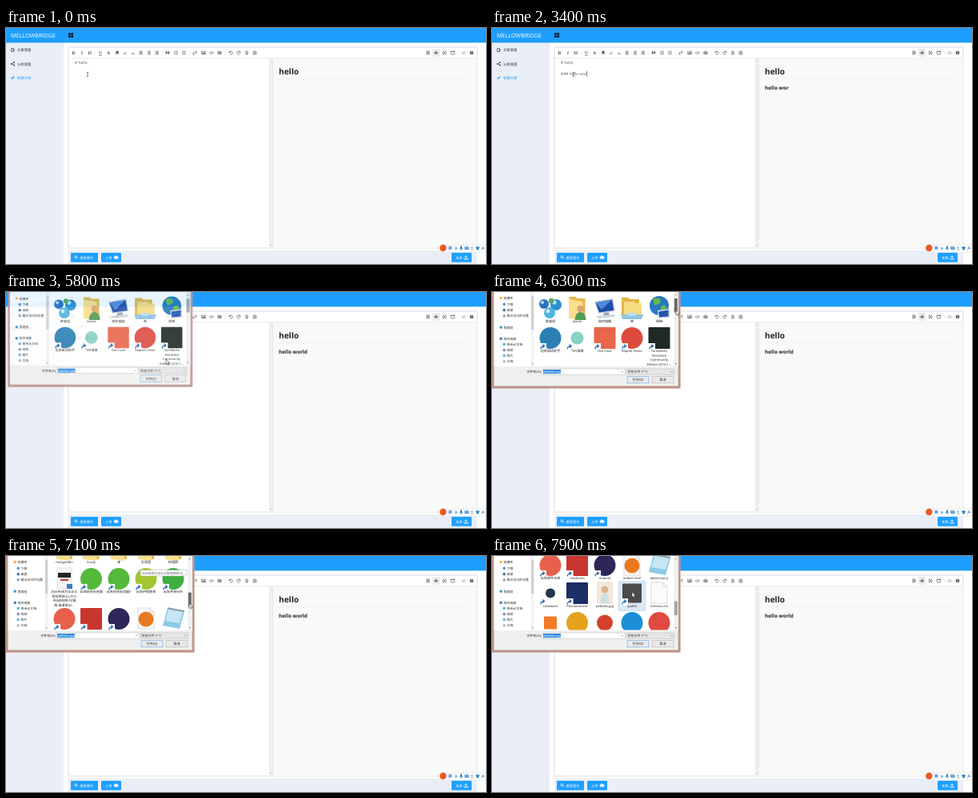
An HTML page for the animation above (8000 ms loop, 600 by 295 pixels).

```html
<!DOCTYPE html>
<html lang="zh">
<head>
<meta charset="utf-8">
<title>Markdown editor</title>
<style>
html, body { margin: 0; width: 100%; height: 100%; overflow: hidden; background: #fff; }
svg { display: block; width: 100vw; height: 100vh; }
text { font-family: "Open Sans", "Noto Sans CJK SC", "Noto Sans CJK", sans-serif; white-space: pre; text-rendering: geometricPrecision; }
.serif { font-family: "Liberation Serif", serif; }
</style>
</head>
<body>
<svg id="stage" viewBox="0 0 600 295" xmlns="http://www.w3.org/2000/svg"></svg>
<script>
const BLUE = '#1e9fff', INK = '#5c5c5c', PANEL = '#eaeef6';

// Markup helpers
const rect = (x, y, w, h, fill, more = '') => `<rect x="${x}" y="${y}" width="${w}" height="${h}" fill="${fill}" ${more}/>`;
const disc = (x, y, r, fill, more = '') => `<circle cx="${x}" cy="${y}" r="${r}" fill="${fill}" ${more}/>`;
const label = (x, y, s, size, fill = '#333', more = '') => `<text x="${x}" y="${y}" font-size="${size}" fill="${fill}" ${more}>${s}</text>`;
const line = (x, y, d, color = INK, w = 0.65) => `<path transform="translate(${x} ${y})" d="${d}" fill="none" stroke="${color}" stroke-width="${w}"/>`;
const solid = (x, y, d, color = INK) => `<path transform="translate(${x} ${y})" d="${d}" fill="${color}"/>`;
const MID = 'text-anchor="middle"';

const CLOUD = 'M-2 1.6a1.3 1.3 0 0 1 0-2.5a1.7 1.7 0 0 1 3.2-.5a1.5 1.5 0 0 1 .9 3z';
const UPLOAD = 'M-2.2 .8v1.4h4.4v-1.4M0 1V-2M-1.5-.6L0-2.1L1.5-.6';
const PENCIL = 'M-2 2l.4-1.5L1-2l1.1 1.1L-.5 1.6z';

function shell() {
  const button = (x, w, s, tx) => rect(x, 281, w, 11.7, BLUE, 'rx="1"') + label(tx, 288.5, s, 4.3, '#fff');
  return rect(0, 0, 600, 295, '#fff') + rect(0, 18, 72, 277, PANEL) + rect(0, 0, 600, 18.4, BLUE)
    + label(6, 11.6, 'MELLOWBRIDGE', 7.25, '#fff')
    + [[78, 6], [81.3, 6], [78, 9.2], [81.3, 9.2]].map(([x, y]) => rect(x, y, 2.8, 2.8, '#0a1a28', 'rx=".9"')).join('')
    + line(8.2, 27.4, 'M-1.8-1V2H1V-2H-.8zM-.8-2v1h-1M1-1h.9V2H1', '#333', 0.6)
    + label(14, 29, '文章管理', 4.35)
    + line(8.4, 44.8, 'M1.5-1.6L-1.5 0L1.5 1.6', '#333', 0.6)
    + disc(6.8, 44.8, 0.9, '#333') + disc(10, 43.1, 0.9, '#333') + disc(10, 46.5, 0.9, '#333')
    + label(14, 46.6, '分类管理', 4.35)
    + solid(8.4, 62.2, PENCIL, BLUE) + label(14, 64, '新建文章', 4.35, BLUE)
    + rect(78, 277.8, 511, 18, PANEL)
    + button(81, 34, '搜索图片', 92.3)
    + line(87.8, 286.5, 'M.6.6L2 2M1-.4A1.4 1.4 0 1 1-1.8-.4A1.4 1.4 0 1 1 1-.4', '#fff', 0.8)
    + button(119, 25, '上传', 124) + solid(137.5, 286.9, CLOUD, '#fff')
    + button(557, 25, '发表', 562) + line(575, 286.9, UPLOAD, '#fff', 0.9);
}

function toolbar() {
  const letter = (x, s, more = '') => label(x, 33, s, 5.8, INK, MID + ' class="serif" font-weight="bold" ' + more);
  const bars = (x, from) => line(x, 31, from.map((a, i) => `M${a[0]} ${i * 1.3 - 2}H${a[1]}`).join(''), INK, 0.7);
  const L = -2.2, R = 2.2;
  const code = 'M-1.2-1.5L-2.6 0L-1.2 1.5M1.2-1.5L2.6 0L1.2 1.5M.4-1.9L-.4 1.9';
  const bullets = x => line(x, 31, 'M-1 -1.7H2.3M-1 0H2.3M-1 1.7H2.3') + line(x, 31, 'M-2.3-1.7h.8M-2.3 0h.8M-2.3 1.7h.8', INK, 0.9);
  return letter(84.5, 'B') + letter(95, 'I', 'font-style="italic"') + letter(104.7, 'H')
    + letter(118, 'U', 'text-decoration="underline"') + letter(128.3, 'S', 'text-decoration="line-through"')
    + solid(139, 31, 'M-1.6-2.2H1.6V2.2L0 .8L-1.6 2.2z')
    + label(149, 32.6, 'x²', 5, INK, MID + ' class="serif" font-weight="bold"')
    + label(159, 32.6, 'x₂', 5, INK, MID + ' class="serif" font-weight="bold"')
    + bars(169, [[L, 1], [L, R], [L, .6], [L, R]]) + bars(179, [[-1.2, 1.2], [L, R], [-1, 1], [L, R]])
    + bars(188.5, [[-1, R], [L, R], [-.6, R], [L, R]])
    + solid(202, 31, 'M-2.3-1.8h1.9v2L-1.4 1.8h-.9zM.4-1.8h1.9v2L1.3 1.8H.4z')
    + bullets(212.5) + bullets(222.3)
    + line(236, 31, 'M-.3.8L-1.1 1.8A1 1 0 0 1-2.1.4L-.4-1M.3-.8L1.1-1.8A1 1 0 0 1 2.1-.4L.4 1', INK, 0.8)
    + line(247, 31, 'M-2.4-1.8H2.4V1.8H-2.4z', INK, 0.6) + solid(247, 31, 'M-1.8 1.3V.6L-.8-.4L0 .3L1-1L1.8.2V1.3z')
    + line(257, 31, code) + line(267, 31, 'M-2.2-1.8H2.2V1.8H-2.2zM-2.2-.5H2.2M-2.2.7H2.2M-.7-1.8V1.8M.8-1.8V1.8', INK, 0.5)
    + line(281, 31, 'M-1.8-2V-.4H-.2M-1.8-.6A2 2 0 1 1-1.3 1.5', INK, 0.75)
    + line(291, 31, 'M1.8-2V-.4H.2M1.8-.6A2 2 0 1 0 1.3 1.5', INK, 0.75)
    + line(301, 31, 'M-1.4-1.2L-1.2 2.1H1.2L1.4-1.2M-2-1.4H2M-.6-2.1H.6M-.4-.4V1.4M.4-.4V1.4', INK, 0.55)
    + line(311, 31, 'M-2-2H1.3L2-1.3V2H-2zM-1-2V-.7H.8V-2M-1.1 2V.5H1.1V2', INK, 0.55)
    + bars(527.5, [[L, R], [L, R], [L, R], [L, R]])
    + rect(533.2, 26.6, 8.8, 8.8, '#eee', 'stroke="#ddd" stroke-width=".5"')
    + line(537.6, 31, 'M-2.5 0Q0-3.2 2.5 0Q0 3.2-2.5 0z', '#444', 0.6) + disc(537.6, 31, 1, '#444')
    + line(548, 31, 'M-1.7-1.7L1.7 1.7M1.7-1.7L-1.7 1.7') + solid(548, 31, 'M-2.2-2.2h1.9l-1.9 1.9zM2.2-2.2v1.9l-1.9-1.9zM2.2 2.2H.3L2.2.3zM-2.2 2.2V.3L-.3 2.2z')
    + line(558.3, 31, 'M-2.2-1.9H2.2V1.9H-2.2zM-2.2-1.4H2.2') + line(572, 31, code, '#888')
    + disc(582, 31, 2.3, '#555') + label(582, 32.5, '?', 4, '#fff', MID + ' font-weight="bold"')
    + [111, 195, 229, 274, 565].map(x => rect(x, 27.5, 0.4, 7, '#e4e4e4')).join('');
}

function editor() {
  return rect(78, 24, 511, 251, '#fff', 'stroke="#d4d4d4" stroke-width=".8"')
    + rect(333, 38, 255.6, 236.6, '#f9f9f9') + rect(78, 37.6, 511, 0.6, '#ddd')
    + rect(328.6, 38, 4.8, 236.6, '#efefef') + rect(333.2, 38, 0.5, 236.6, '#ddd')
    + solid(331, 41, 'M-1 .6L0-.6L1 .6z', '#aaa') + solid(331, 271.6, 'M-1-.6L0 .6L1-.6z', '#aaa')
    + toolbar() + label(86, 45.2, '# hello', 4.9, INK)
    + `<text id="typed" x="86" y="59.2" font-size="4.9" fill="${INK}"></text>`
    + `<rect id="caret" width=".6" height="6.6" fill="#222"/>`
    + label(341, 57.8, 'hello', 10.1, '#222', 'font-weight="bold"') + rect(341, 63, 239, 0.5, '#e9e9e9')
    + `<text id="heading" x="341" y="76.8" font-size="6.4" font-weight="bold" fill="#222"></text>`;
}

function inputBar() {
  const c = '#2b80cf';
  return rect(544, 271, 56, 9, '#fdfdfd', 'stroke="#cfd8e0" stroke-width=".5"') + disc(546.3, 275, 4.2, '#f0561f')
    + label(555.2, 277.2, '英', 5, c, MID + ' font-weight="bold"')
    + solid(562, 275.4, 'M-.8-1.6A1.7 1.7 0 1 1-1 1.4A1.6 1.6 0 0 0-.8-1.6z', c)
    + rect(567.8, 272.6, 2.2, 3.6, c, 'rx="1"') + line(569, 275.4, 'M-1.8-.3A1.8 1.8 0 0 0 1.8-.3M0 1.5V2.5', c, 0.6)
    + rect(573.4, 273.2, 5, 3.8, c, 'rx=".6"') + line(576, 275, 'M-1.8-.7H1.8M-1.8.7H1.8', '#fff', 0.45)
    + disc(582.4, 274.4, 1.1, '#9ab') + solid(582.6, 276, 'M-2 1.6Q0-1.5 2 1.6z', '#9ab')
    + solid(589.5, 275.2, 'M-1-2H1L2.6-.8L1.8.4L1.3 0V2.2H-1.3V0L-1.8.4L-2.6-.8z', c)
    + line(596, 275.2, 'M-1.8 2L.6-.4', c, 1) + line(596, 275.2, 'M.4-2A1.3 1.3 0 1 0 2 .1', c, 0.9);
}

// Icons are drawn around 0,0 in about 28 px
const ICONS = {
  home: () => disc(-8, -5, 6, '#2c6fbd') + disc(7, -4, 7, '#2a8fd0') + disc(-1, 6, 7, '#4fb4dc')
    + disc(-10, -7, 2.2, '#a8d3f3') + disc(5, -7, 2.6, '#b5e0f5') + disc(-3, 4, 2.4, '#d3f1fa')
    + disc(1, -9, 3.2, '#5aa65c'),
  folder: () => solid(0, 0, 'M-10-14H-2L0-12H10V13H-10z', '#e3b94f') + solid(0, 0, 'M-10-11L7-8V15L-10 13z', '#f8df8b'),
  user: () => ICONS.folder() + disc(4, 1, 4, '#d9a273') + solid(4, 10, 'M-7 5Q-6-5 0-5Q6-5 7 5z', '#4f9d52'),
  pc: () => solid(0, 0, 'M-13-8L10-12L13 4L-8 7z', '#c5d2de') + solid(0, 0, 'M-11.5-6.8L9-10.4L11.4 2.8L-7 5.4z', '#1f4ea8')
    + solid(0, 0, 'M-11.5-6.8L9-10.4L-4 2z', '#5488da') + solid(0, 0, 'M-1 6L5 5.2L6 9H-2z', '#97a6b4') + solid(0, 0, 'M-11 10L12 8L13 11L-9 13z', '#cfd7df'),
  shelf: () => solid(0, 0, 'M-13-13H-4L-3-11H9V9H-13z', '#e2b548') + solid(0, 0, 'M-10-8H3L5-6H12V10H-10z', '#f6dc83')
    + solid(0, 0, 'M-14 8H14L12 14H-12z', '#8fc4e4') + rect(-5, 6, 10, 4, '#b9ddf0'),
  globe: () => disc(0, -3, 12, '#2678c0') + solid(-1, -3, 'M-7-8Q2-12 3-5Q0 0-5-1zM3 1Q10-3 10 4Q6 9 3 6z', '#67b84c')
    + solid(0, 0, 'M-2 3L13 1V12L-1 13z', '#d4dde6') + solid(0, 0, 'M-.6 4.4L11.6 2.6V10.6L0 11.6z', '#2455b0'),
  page: c => solid(0, 0, 'M-10-13H5L10-8V13H-10z', '#fbfbfb') + line(0, 0, 'M-10-13H5L10-8V13H-10zM5-13V-8H10', '#c4c4c4', 0.6) + (c ? disc(0, 1, 9.5, c) : ''),
  book: () => rect(-9, -13, 18, 26, '#f4f4f4', 'stroke="#ccc" stroke-width=".5"') + rect(-8, -7, 16, 6, '#242424') + rect(-5, 1, 10, 2, '#c33') + rect(3, 7, 7, 6, '#3c7fc4'),
  note: () => solid(0, 0, 'M-7-13L14-9L8 13L-13 9z', '#8ec9e6') + solid(0, 0, 'M-6-11L12-8L8 6L-10 3z', '#c6e6f3') + line(0, 0, 'M-7-13L14-9', '#8a8f96', 1.6),
  photo: () => rect(-10, -14, 20, 28, '#f3e8da') + disc(0, -4, 4.5, '#dbb48c') + solid(0, 6, 'M-6 7Q-5-6 0-6Q5-6 6 7z', '#cfe0e4'),
  disc: (c, r = 13.5) => disc(0, 0.5, r, c),
  box: (c, r = 13.5) => rect(-r, 0.5 - r, r * 2, r * 2, c, 'rx="1"')
};
const shortcut = rect(-14, 7, 9, 8.6, '#fff') + line(-9.8, 11.4, 'M-2.5 3Q-2-1 2-1M0-3L2.4-1L0 1.2', '#2264b4', 1.2);

// Each row: centre, then "icon color radius+|label"; a plus marks a shortcut
const ROWS = [
  [20, 'home|家庭组', 'user|tavino', 'pc|我的电脑', 'shelf|库', 'globe|网络'],
  [57, 'disc #2b7fb4+|迅岚驱动助手', 'disc #86d4c4 8+|飞叶录屏', 'box #e8664a+|Dot Cove', 'disc #dd4b3e+|Maplet Vision', 'box #1f2a24+|TarnWorks/FernDeck/Community/Edition 2016.1...'],
  [111, 'folder|照片', 'folder|资料', 'folder|作业', 'folder|软件', 'folder|音乐'],
  [148, 'folder|课件', 'folder|notes', 'folder|模板', 'folder|代码', 'folder|temp'],
  [185, 'folder|文稿', 'folder|备份', 'folder|图标', 'folder|demo', 'folder|素材'],
  [222, 'folder|mistgarden', 'folder|Study', 'folder|缘', 'folder|实验室', 'folder|校园网'],
  [259, 'book|[Net布线方法与工/程范例讲义].方小/舟&amp;赵知秋.扫描/版.高清版02...', 'disc #55b93b+|云岚轻快浏览器', 'disc #55b93b+|云岚轻快浏览器7', 'disc #a3c531+|云岚护航管家', 'disc #3fae40+|云岚共享WIFI'],
  [309, 'disc #e8604c+|云岚软件仓库', 'box #c9352f+|tinybricks', 'disc #2d2658+|moonlit', 'page #e87b22|index2.html', 'note|datescript.js'],
  [344, 'disc #22364c 6+|Lowbeam', 'box #1d2d66+|Paintdesk.exe', 'photo|pebbles.jpg', 'box #4b4b4b 12+|quillet', 'page|timeaxis.txt'],
  [381, 'box #f27a24 8|panel', 'disc #e5a21d|游戏盒', 'disc #d3402b 10|画板', 'disc #1c8fd8|播放器', 'disc #e14a40|小助手']
];
const COLS = [73, 106.5, 141, 175, 209];

function fileItem(spec, x, y) {
  const [icon, text] = spec.split('|'), [kind, color, size] = icon.replace('+', '').split(' ');
  return `<g transform="translate(${x} ${y})">${ICONS[kind](color, size && +size)}${icon.endsWith('+') ? shortcut : ''}</g>`
    + text.split('/').map((s, i) => label(x, y + 18.3 + i * 5.5, s, 4.1, '#222', MID)).join('');
}

function dialog() {
  const nav = [['收藏夹', 7.6, 0, '#f3b63b'], ['下载', 15.4, 1, '#4d9bd6'], ['桌面', 22.6, 1, '#3677bd'], ['最近访问的位置', 29.8, 1, '#7ea9c9'],
    ['家庭组', 44.2, 0, '#36a0d4'], ['我的电脑', 58.4, 0, '#4180c0'], ['青禾云文档', 65.4, 1, '#58b5ea'], ['视频', 72.6, 1, '#7c8fa6'], ['图片', 79.6, 1, '#6fb1d8'], ['文档', 86.8, 1, '#a9b9c8']];
  const button = (x, s, edge) => rect(x, 105.3, 27, 8.6, '#e9e9e9', `stroke="${edge}" stroke-width=".6"`) + label(x + 13.5, 111.1, s, 4, '#222', MID);
  const field = (x, w, fill) => rect(x, 96, w, 7.2, fill, 'stroke="#b5b5b5" stroke-width=".5"') + line(x + w - 3.2, 99.5, 'M-1-.5L0 .6L1-.5', '#444', 0.5);
  return rect(0, -12, 235.6, 132.6, '#bf978c') + rect(2.6, -12, 230, 129.4, '#f0f0f0') + rect(2.6, -12, 230, 105, '#fff')
    + nav.map(([s, y, deep, c]) => rect(9.6 + deep * 4, y - 1.6, 3.2, 3.2, c, 'rx=".8"') + label(14.5 + deep * 4, y + 1.5, s, 3.95)).join('')
    + rect(48.6, 0, 4, 93, '#f3f3f3') + rect(49, 5, 3.2, 42, '#d0d0d0') + solid(50.6, 90, 'M-1-.5L0 .7L1-.5z', '#666')
    + `<g clip-path="url(#pane)"><g id="files">`
    + `<rect id="hover" x="158" y="329.5" width="34" height="37" fill="#d9e8f4" stroke="#b4d0e6" stroke-width=".5"/>`
    + ROWS.map(([y, ...items]) => items.map((s, i) => fileItem(s, COLS[i], y)).join('')).join('') + '</g></g>'
    + rect(227.2, 0, 5.2, 93, '#f0f0f0') + solid(229.8, 3.4, 'M-1 .6L0-.6L1 .6z', '#555') + solid(229.8, 89.6, 'M-1-.6L0 .6L1-.6z', '#555')
    + `<rect id="thumb" x="227.8" width="4" height="17.5"/>`
    + `<g id="tip">${rect(168, 17.6, 58, 7.4, '#fff', 'stroke="#a5a5a5" stroke-width=".5"')}${label(169.5, 22.8, '[Net布线方法与工程范例讲义]...', 3.9, '#555')}</g>`
    + label(61.8, 101, '文件名(N):', 4, '#222', 'text-anchor="end"') + field(63, 103, '#fff') + rect(64, 97, 22, 5.2, '#2f8be0')
    + label(64.4, 101, 'pebbles.jpg', 4, '#fff') + field(168, 60, '#e6e6e6') + label(169.6, 101, '所有文件 (*.*)', 4)
    + button(169, '打开(O)', '#6aa9e0') + button(200, '取消', '#b5b5b5');
}

const stage = document.getElementById('stage');
stage.innerHTML = '<defs><clipPath id="pane"><rect x="54" y="0" width="173" height="92.6"/></clipPath></defs>'
  + shell() + editor() + inputBar() + `<g id="dialog">${dialog()}</g>`
  + `<g id="beam">${line(0, 0, 'M-1.3-2.8Q0-2.8 0-2Q0-2.8 1.3-2.8M0-2V2M-1.3 2.8Q0 2.8 0 2Q0 2.8 1.3 2.8', '#333', 0.6)}</g>`
  + `<g id="arrow"><path d="M0 0V6.4L1.5 5L2.5 7.3L3.5 6.8L2.5 4.7H4.6z" fill="#fff" stroke="#222" stroke-width=".5"/></g>`;
const ui = {};
stage.querySelectorAll('[id]').forEach(e => ui[e.id] = e);

const LOOP = 8000, TEXT = '### hello world', PREFIX = 4;
const KEYS = [600, 700, 800, 1000, 1600, 1700, 2000, 2100, 2300, 2700, 2900, 3200, 3400, 3600, 3800, 4200, 4400];
const MOUSE = [[0, 102, 58], [4700, 102, 58], [5300, 131, 286], [5500, 131, 286], [5800, 200, 84], [6200, 230, 22], [6400, 230, 23], [7100, 229, 59], [7500, 229, 70], [7800, 175, 45]];
const SCROLL = [[6400, 0], [7100, 231], [7250, 240], [7700, 298]];

// Interpolates [time, ...values] keys
function track(keys, t, ease = k => k) {
  const i = keys.findIndex(k => k[0] > t);
  if (i === 0) return keys[0].slice(1);
  if (i < 0) return keys[keys.length - 1].slice(1);
  const a = keys[i - 1], b = keys[i], k = ease((t - a[0]) / (b[0] - a[0]));
  return a.slice(1).map((v, n) => v + (b[n + 1] - v) * k);
}
const smooth = k => k * k * (3 - 2 * k);
const show = (el, on) => el.setAttribute('visibility', on ? 'inherit' : 'hidden');
const place = (el, x, y) => el.setAttribute('transform', `translate(${x} ${y})`);

function render(t) {
  const count = KEYS.filter(k => k <= t).length, last = count ? KEYS[count - 1] : -600;
  const typed = TEXT.slice(0, count), breaks = Math.max(0, count - TEXT.length);
  if (ui.typed.textContent !== typed) {
    ui.typed.textContent = typed;
    ui.heading.textContent = typed.slice(PREFIX);
  }
  const width = breaks || !typed ? 0 : ui.typed.getComputedTextLength();
  ui.caret.setAttribute('x', 86 + width);
  ui.caret.setAttribute('y', 54 + breaks * 7);
  show(ui.caret, (t - last) % 1060 < 530);

  const [x, y] = track(MOUSE, t, smooth), overText = t < 5500 && y < 270;
  place(ui.beam, x, y);
  place(ui.arrow, x, y);
  show(ui.beam, overText);
  show(ui.arrow, !overText);

  const open = Math.min(1, Math.max(0, (t - 5600) / 300)), fade = 1 - (1 - open) ** 2;
  const zoom = 0.82 + 0.18 * fade;
  show(ui.dialog, open > 0);
  ui.dialog.setAttribute('opacity', fade);
  ui.dialog.setAttribute('transform', `translate(118 30) scale(${zoom}) translate(-118 -30)`);

  const [scroll] = track(SCROLL, t);
  place(ui.files, 0, -scroll);
  ui.thumb.setAttribute('y', 8 + scroll * 0.163);
  ui.thumb.setAttribute('fill', t > 6300 && t < 7500 ? '#6a6a6a' : '#a6a6a6');
  show(ui.tip, t >= 6900 && t < 7300);
  show(ui.hover, t >= 7700);
}

function tick(now) {
  render(now % LOOP);
  requestAnimationFrame(tick);
}
render(0);
requestAnimationFrame(tick);
</script>
</body>
</html>
```
